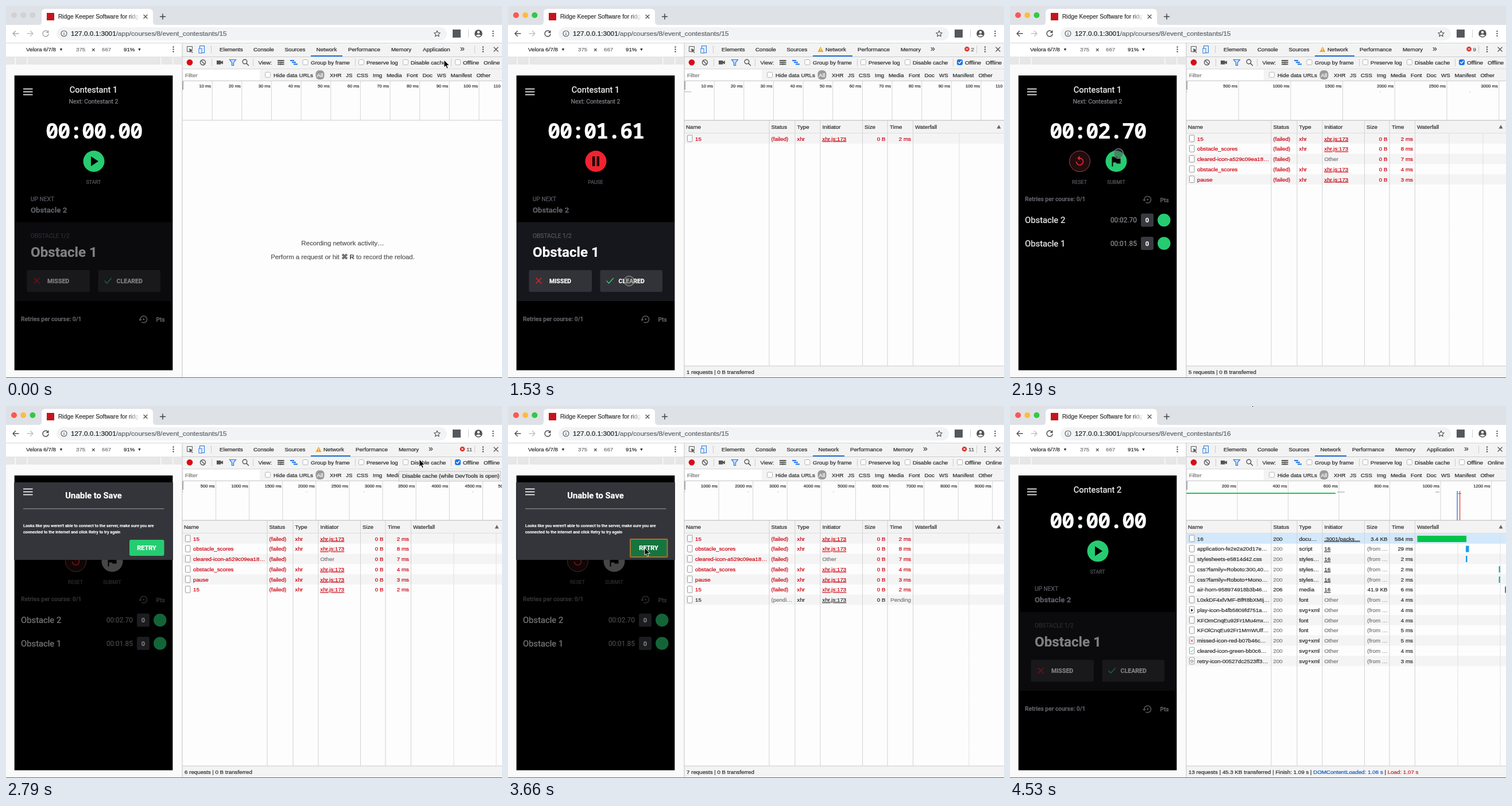
An HTML page that plays this animation: 864 px wide and 648 px high, repeating every 4560 ms.

```html
<!DOCTYPE html>
<html lang="en">
<head>
<meta charset="utf-8">
<title>Offline retry</title>
<style>
html, body { margin: 0; width: 100%; height: 100%; overflow: hidden; background: #fff; }
svg { display: block; width: 100vw; height: 100vh; font: 9.75px "Liberation Sans", Arial, sans-serif; fill: #2b2b2b; }
text { white-space: pre; stroke-width: .22px; }
.ph { font-family: Roboto, sans-serif; }
.mono { font: bold 37.5px "Noto Sans Mono", monospace; letter-spacing: -1.5px; }
.line { fill: none; stroke-linecap: round; stroke-linejoin: round; }
#cursor { animation: travel 4560ms ease-in-out infinite; }
#modal { animation: drop 4560ms ease-out infinite; }
@keyframes travel {
  0% { transform: translate(763px, 94px); }
  4%, 10% { transform: translate(786px, 97px); }
  18%, 21% { transform: translate(152px, 271px); }
  31%, 43% { transform: translate(211px, 479px); }
  48% { transform: translate(189px, 257px); }
  50%, 56% { transform: translate(185px, 269px); }
  61.2% { transform: translate(720px, 93px); }
  64%, 68% { transform: translate(786px, 97px); }
  77%, 83% { transform: translate(238px, 247px); }
  98%, 100% { transform: translate(417px, -13px); }
}
@keyframes drop {
  0%, 56.4% { transform: translateY(-150px); }
  59.5%, 100% { transform: none; }
}
</style>
</head>
<body>
<svg id="stage" viewBox="0 0 864 648" preserveAspectRatio="none"></svg>
<script>
const LOOP = 4560, START = 925, SPLIT = 1620, DONE = 1940, SAVE = 2570, RETRY = 3620, NAV = 4080, END = LOOP;
const OFF = 330, ON = 3020;
const INK = '#2b2b2b', GREEN = '#26cc71', RED = '#cc0010', BLUE = '#1a73e8';

const rect = (x, y, w, h, fill, more = '') => `<rect x="${x}" y="${y}" width="${w}" height="${h}" fill="${fill}" ${more}/>`;
const disc = (x, y, r, fill, more = '') => `<circle cx="${x}" cy="${y}" r="${r}" fill="${fill}" ${more}/>`;
const path = (d, fill, more = '') => `<path d="${d}" fill="${fill}" ${more}/>`;
const line = (d, color, w = 1, more = '') => `<path class="line" d="${d}" stroke="${color}" stroke-width="${w}" ${more}/>`;
const text = (x, y, s, fill = INK, more = '') => `<text x="${x}" y="${y}" fill="${fill}" stroke="${fill}" ${more}>${s}</text>`;
const span = (s, fill) => `<tspan fill="${fill}" stroke="${fill}">${s}</tspan>`;
const mid = 'text-anchor="middle"', end = 'text-anchor="end"';
// Shown only inside the given [from, to) pairs.
const at = (times, body) => `<g data-on="${times}">${body}</g>`;
const dots = (x, y) => [-4, 0, 4].map(d => disc(x, y + d, 1.2, '#555')).join('');
const check = (x, on) => rect(x - 4.5, 93.5, 9, 9, on ? BLUE : '#fff', `rx="2" stroke="${on ? BLUE : '#b5b5b5'}"`) +
  (on ? line(`M${x - 2.5} 98l2 2 3.3-4.2`, '#fff', 1.4) : '');

function browser() {
  const lights = colors => colors.map((c, i) => disc(14 + i * 16.2, 16, 5, c)).join('');
  const reload = c => line('M73 45A5 5 0 1 0 74 49', c, 1.5) + path('M74.5 42v5h-5z', c);
  const back = c => line('M22 48H12m4.5-4.5L12 48l4.5 4.5', c, 1.5);
  const url = id => text(113, 52, '127.0.0.1:3001' + span('/app/courses/8/event_contestants/' + id, '#5f6368'), '#222', 'font-size="11.8"');
  return rect(0, 0, 864, 34, '#dee1e6') + rect(0, 33, 864, 32, '#fff') +
    path('M56 33Q62 33 62 27V12Q62 5 69 5H249Q256 5 256 12V27Q256 33 262 33Z', '#fff') +
    at([0, 250], lights(Array(3).fill('#d0d2d5')) + reload('#aaa') + back('#aaa')) +
    at([250, END], lights(['#fc5753', '#fdbc40', '#34c749']) + reload('#505356') + back('#505356')) +
    rect(71, 12, 13, 13, '#c4151c') +
    text(91, 22, 'Ridge Keeper Software for ridge', '#333', 'font-size="10.2"') +
    rect(213, 8, 19, 20, 'url(#fade)') + rect(232, 8, 22, 20, '#fff') +
    line('M240 15.5l6 6m0-6l-6 6', '#555', 1.3) + line('M268.5 18.5h9m-4.5-4.5v9', '#444', 1.5) +
    rect(88, 37, 680, 23, '#f1f3f4', 'rx="11.5"') +
    line('M37 48h10m-4.5-4.5L47 48l-4.5 4.5', '#c0c2c4', 1.5) +
    disc(101, 48, 5, 'none', 'stroke="#5f6368" stroke-width="1.2"') + line('M101 47.5v3m0-5v.1', '#5f6368', 1.2) +
    at([0, NAV], url(15)) + at([NAV, END], url(16)) +
    line('M751 43l1.5 3.5 3.8.3-2.9 2.5.9 3.7-3.3-2-3.3 2 .9-3.7-2.9-2.5 3.8-.3z', '#555', 1.1) +
    rect(778, 41, 14, 14, '#55585c') + rect(805, 41, 1, 14, '#d0d0d0') +
    disc(823, 48, 6.8, '#505356') + disc(823, 45.7, 2.3, '#fff') + path('M818.5 51.5Q823 47.5 827.5 51.5Q823 55 818.5 51.5Z', '#fff') +
    dots(848.5, 48) + rect(0, 64, 864, 1, '#d4d4d4');
}

function deviceBar() {
  const arrow = x => text(x, 78, '▼', INK, 'font-size="7"');
  return rect(0, 65, 307, 583, '#fafafa') + rect(0, 65, 307, 24, '#fff') +
    text(35, 79, 'Velora 6/7/8') + arrow(92.5) +
    text(122, 79, '375', '#777') + text(149, 79.5, '×', INK, 'font-size="11"') + text(167, 79, '667', '#777') +
    text(205, 79, '91%') + arrow(229) + dots(291.5, 75.5) +
    rect(0, 89, 306, 13, '#e7e7e7') + [15.5, 36, 269, 290].map(x => rect(x, 89, 1.5, 13, '#fafafa')).join('') +
    rect(0, 88, 307, 1, '#e5e5e5');
}

const history = y => path('M14 12c0-1.1-.9-2-2-2s-2 .9-2 2 .9 2 2 2 2-.9 2-2zm-2-9c-4.97 0-9 4.03-9 9H0l4 4 4-4H5c0-3.87 3.13-7 7-7s7 3.13 7 7-3.13 7-7 7c-1.51 0-2.91-.49-4.06-1.3l-1.42 1.44C8.04 20.3 9.94 21 12 21c4.97 0 9-4.03 9-9s-4.03-9-9-9z',
  '#5b5d63', `transform="translate(231 ${y - 11.5}) scale(.73)"`);
const bold = size => `font-size="${size}" font-weight="700"`;
const retries = y => text(26, y, 'Retries per course: 0/1', '#5b5d63', bold(10.25)) +
  history(y) + text(261.5, y + 1.5, 'Pts', '#5b5d63', bold(10));
const score = (y, no, time) => text(26, y + 5.3, 'Obstacle ' + no, '#f4f4f4', 'font-size="14.8"') +
  text(221, y + 4.3, time, '#8b8d93', 'font-size="11.9" ' + end) + rect(228, y - 11.5, 22, 23, '#393a40', 'rx="3"') +
  text(239, y + 4, '0', '#fff', bold(11) + mid) + disc(268.3, y, 11.2, GREEN);
const caption = (x, s) => text(x, 310, s, '#595c64', 'font-size="8.8" ' + mid);
const play = disc(153, 270.5, 18.5, GREEN) + path('M148 262v17l13-8.5z', '#000') + caption(152.5, 'START');
const pause = disc(153, 270.5, 18.5, '#f0232f') + rect(147, 262, 4.3, 17, '#000') + rect(154.7, 262, 4.3, 17, '#000') + caption(152.5, 'PAUSE');
const heading = (no, next) => text(152.5, 151, 'Contestant ' + no, '#fff', 'font-size="14.6" ' + mid) +
  (next ? text(152.5, 170, 'Next: Contestant ' + next, '#85888f', 'font-size="10.4" ' + mid) : '');
const timer = id => text(69, 230.5, '00:00.00', '#fff', `class="mono" id="${id}"`);
const upNext = text(43, 340, 'UP NEXT', '#5c5f68', 'font-size="10.2"') + text(43, 359.5, 'Obstacle 2', '#5c5f66', bold(13.2));

function panel(no, opacity) {
  return `<g opacity="${opacity}">` + rect(15, 376.5, 275, 137.5, '#16171c') +
    text(43, 403.5, `OBSTACLE ${no}/2`, '#565960', 'font-size="10.2"') +
    text(43, 436.5, 'Obstacle ' + no, '#fff', bold(24.2)) +
    rect(36.5, 460, 109.5, 38, '#323338', 'rx="3"') + rect(160.5, 460, 108.5, 38, '#323338', 'rx="3"') +
    line('M49 474l9 9m0-9l-9 9', '#e02530', 1.4) + line('M172 479l3.6 4 7.6-8.6', GREEN, 1.5) +
    text(72, 482.7, 'MISSED', '#fff', bold(10.6)) + text(192.5, 482.7, 'CLEARED', '#fff', bold(10.6)) + '</g>';
}

function finish() {
  const flag = fill => disc(185, 270.5, 18.5, fill) + path('M14.4 6L14 4H5v17h2v-7h5.6l.4 2h7V6z', '#000', 'transform="translate(172.5 258.5)"');
  return disc(121.5, 270.5, 18, '#230c0d', 'stroke="#8a5050"') +
    path('M12 5V1L7 6l5 5V7c3.31 0 6 2.69 6 6s-2.69 6-6 6-6-2.69-6-6H4c0 4.42 3.58 8 8 8s8-3.58 8-8-3.58-8-8-8z', '#e0262f', 'transform="translate(111.3 260) scale(.85)"') +
    at([0, SAVE], flag(GREEN)) + at([SAVE, END], flag('#8e8e8e')) +
    caption(121, 'RESET') + caption(185, 'SUBMIT') + retries(340) +
    score(373, 2, '00:02.70') + score(413.5, 1, '00:01.85');
}

function modal() {
  const small = 'font-size="7.25" font-weight="500"';
  return rect(15, 121, 275, 513, '#000', 'opacity=".5"') + '<g id="modal">' + rect(14, 133, 277, 135, '#34353a') +
    text(152.5, 161, 'Unable to Save', '#fff', bold(14.7) + mid) +
    rect(30, 178.5, 245.5, 1, '#a0a1a5') +
    text(30, 211, 'Looks like you weren\'t able to connect to the server, make sure you are', '#fff', small) +
    text(30, 222, 'connected to the internet and click Retry to try again', '#fff', small) +
    at([SAVE, 3560], rect(215, 233, 60.5, 28, GREEN, 'rx="3"')) +
    at([3560, NAV], rect(213, 232, 64.5, 31, '#15753f', 'stroke="#a8702c" stroke-width="2" rx="1"')) +
    text(245, 251, 'RETRY', '#fff', bold(11) + mid) + '</g>';
}

function phone() {
  return '<g class="ph" clip-path="url(#screen)">' + rect(14, 121, 277, 514, '#000') +
    at([0, NAV], heading(1, 2) + timer('clock')) +
    at([0, SPLIT], upNext) +
    at([0, START], play + panel(1, .5)) +
    at([START, SPLIT], pause + panel(1, 1)) +
    at([SPLIT, DONE], pause + panel(2, 1) + score(581, 1, '00:01.85')) +
    at([0, DONE], retries(548.5)) +
    at([DONE, NAV], finish()) + at([SAVE, NAV], modal()) +
    at([4160, END], heading(2) + '<g transform="translate(0 -17.7)">' +
      timer('idle') + play + upNext + panel(1, .5) + retries(548.5) + '</g>') +
    [144.5, 149.5, 154.5].map(y => rect(30, y - .8, 16.5, 1.6, '#fff')).join('') + '</g>';
}

function tabs() {
  const names = list => list.map(([x, s]) => text(x, 79, s)).join('');
  const more = x => text(x, 79, '»', '#444', 'font-size="14"');
  const plain = names([[540.5, 'Network'], [596, 'Performance'], [671, 'Memory']]) + rect(531, 86, 55, 2, BLUE);
  const error = (x, n) => disc(x, 75, 4.3, '#d9302c') + line(`M${x - 1.5} 73.5l3 3m0-3l-3 3`, '#fff', 1) + text(x + 7, 79, n, '#555');
  return rect(307, 65, 557, 66, '#f3f3f3') +
    line('M320 79.5h-4.5v-9h9v4.5', '#555') + path('M319 74l7 3-3 1 2.5 3-1 1-2.5-3-1.5 2.5z', '#555') +
    rect(337.5, 69.5, 8, 12, 'none', `stroke="${BLUE}"`) + rect(336, 74, 5, 8, '#fff', `stroke="${BLUE}"`) +
    rect(357, 69, 1, 13, '#ccc') +
    names([[372, 'Elements'], [431, 'Console'], [485.5, 'Sources']]) +
    at([0, OFF, NAV, END], plain + text(726, 79, 'Application') + more(791)) +
    at([OFF, ON], names([[553, 'Network'], [609, 'Performance'], [684, 'Memory']]) + more(736) + rect(531, 86, 69, 2, BLUE) +
      path('M544.5 71l5 9h-10z', '#f0a31c') + rect(544, 74, 1, 3, '#fff') + rect(544, 78, 1, 1, '#fff')) +
    at([ON, NAV], plain + more(723)) +
    at([START, SPLIT], error(799.5, 2)) + at([SPLIT, DONE], error(799.5, 5)) +
    at([DONE, SAVE], error(799.5, 9)) + at([SAVE, NAV], error(795, 11)) +
    rect(816, 69, 1, 13, '#ccc') + dots(831, 75.5) + line('M850 72l7 7m0-7l-7 7', '#555', 1.4) +
    rect(307, 88, 557, 1, '#ccc');
}

function toolbar() {
  const bars = (x, c, shift) => [0, 1, 2].map(i => rect(x + i * shift, 94 + i * 3.2, 7, 2, c)).join('');
  const types = [[564, 'XHR'], [592, 'JS'], [611, 'CSS'], [639, 'Img'], [663, 'Media'], [698, 'Font'], [725.5, 'Doc'], [751, 'WS'], [774.5, 'Manifest'], [819.5, 'Other']];
  return disc(320, 98.3, 5.3, '#d80c18') + disc(343, 98.3, 4.5, 'none', 'stroke="#555" stroke-width="1.4"') + line('M340 95.2l6 6', '#555', 1.3) +
    [358, 430, 608, 775].map(x => rect(x, 92, 1, 13, '#ccc')).join('') +
    path('M367 95h7.5v2.2l3.5-2v6.4l-3.5-2v2.2H367z', '#555') + path('M389.5 93.5h11l-4 5v5h-3v-5z', '#cfe3ff', `stroke="${BLUE}" stroke-width="1.2"`) +
    disc(416, 97, 3.8, 'none', 'stroke="#555" stroke-width="1.4"') + line('M419 100l3.5 3.5', '#555', 1.6) +
    text(439.5, 101.5, 'View:') + bars(473, '#555', 0) + bars(477.5, '#555', 0) + bars(495, BLUE, 3) +
    check(521.5) + text(531, 101.5, 'Group by frame') + check(619) + text(628, 101.5, 'Preserve log') + check(696) + text(705, 101.5, 'Disable cache') +
    at([0, OFF, ON, END], check(787) + text(832, 101.5, 'Online')) +
    at([OFF, ON], check(787, true) + text(832, 101.5, 'Offline')) + text(796, 101.5, 'Offline') +
    rect(307, 109, 557, 1, '#ddd') + rect(309, 111, 133, 18, '#fff') + text(312, 123.7, 'Filter', '#777') +
    '<g transform="translate(0 21.8)">' + check(456) + '</g>' + text(466, 123.7, 'Hide data URLs') +
    rect(539.5, 112, 15, 16, '#9b9b9b', 'rx="6"') + text(547, 123.7, 'All', '#fff', mid) +
    types.map(([x, s]) => text(x, 123.7, s)).join('') + rect(307, 130, 557, 1, '#ccc');
}

// Cells: name, status, type, initiator, size, time.
function row(i, cells, color, dim = color, icon = '') {
  const y = 222 + i * 17.75, b = y + 12.6, [name, status, type, from, size, time] = cells;
  const other = from === 'Other';
  return (i % 2 ? '' : rect(308, y, 556, 17.75, name === '16' ? '#d3e8fb' : '#f4f4f4')) +
    rect(312.5, y + 3, 8.5, 11.5, '#fff', 'stroke="#999" rx="1"') + icon +
    text(326, b, name, color) + text(458.5, b, status, dim) + text(503.5, b, type, color) +
    text(547.5, b, from, other ? '#777' : color, other ? '' : 'text-decoration="underline"') +
    text(657.5, b, size, size.startsWith('(') ? dim : color, end) +
    text(702, b, time, time === 'Pending' ? dim : color, end);
}

function table() {
  const js = 'xhr.js:173', fail = (i, name, ms, from = js) => row(i, [name, '(failed)', from === js ? 'xhr' : '', from, '0 B', ms + ' ms'], RED);
  const cached = [
    ['application-fe2e2a20d17e…', 'script', '16', 29], ['stylesheets-e5814d42.css', 'styles…', '16', 2],
    ['css?family=Roboto:300,40…', 'styles…', '16', 2], ['css?family=Roboto+Mono…', 'styles…', '16', 2],
    ['air-horn-958974918b3b46…', 'media', '16', 6], ['L0xkDF4xlVMF-BfR8bXMIj…', 'font', 'Other', 4],
    ['play-icon-b4fb5809fd751a…', 'svg+xml', 'Other', 4], ['KFOmCnqEu92Fr1Mu4mx…', 'font', 'Other', 4],
    ['KFOlCnqEu92Fr1MmWUlf…', 'font', 'Other', 5], ['missed-icon-red-b07b46c…', 'svg+xml', 'Other', 5],
    ['cleared-icon-green-bb0c6…', 'svg+xml', 'Other', 4], ['retry-icon-00527dc2523ff3…', 'svg+xml', 'Other', 3]];
  const icons = { 7: path('M315.5 353.3v5l3.5-2.5z', '#000'), 10: line('M315 407l3.5 3.5m0-3.5l-3.5 3.5', RED, .9),
    11: line('M315 427l1.3 1.5 2.6-3.5', GREEN, .9), 12: disc(316.8, 444.5, 2, 'none', 'stroke="#555" stroke-width=".9"') };
  const loaded = cached.map(([name, type, from, ms], i) => {
    const full = type === 'media';
    return row(i + 1, [name, full ? 206 : 200, type, from, full ? '41.9 KB' : '(from …', ms + ' ms'], INK, full ? INK : '#777', icons[i + 1]);
  }).join('');
  const heads = [[310, 'Name'], [458.5, 'Status'], [503.5, 'Type'], [547.5, 'Initiator'], [621, 'Size'], [665, 'Time'], [709, 'Waterfall']];
  const status = (s, from, to) => at([from, to], text(311, 641, s));
  const failed = (n, from, to) => status(n + ' requests | 0 B transferred', from, to);
  return at([START, END],
    rect(307, 199, 557, 23, '#f3f3f3') + rect(307, 199, 557, 1, '#ccc') + rect(307, 221.5, 557, 1, '#ccc') +
    heads.map(([x, s]) => text(x, 214, s)).join('') + path('M851.5 213.5h7l-3.5-6.5z', '#666') +
    at([START, NAV], fail(0, '15', 2)) +
    at([SPLIT, NAV], fail(1, 'obstacle_scores', 8) + fail(2, 'cleared-icon-a529c09ea18…', 7, 'Other')) +
    at([DONE, NAV], fail(3, 'obstacle_scores', 4) + fail(4, 'pause', 3)) +
    at([SAVE, NAV], fail(5, '15', 2)) +
    at([RETRY, NAV], row(6, ['15', '(pendi…', 'xhr', js, '0 B', 'Pending'], INK, '#777')) +
    at([NAV, END], row(0, ['16', 200, 'docu…', ':3001/packs…', '3.4 KB', '584 ms'], INK)) +
    at([4180, END], loaded) +
    [455, 500, 544, 617.5, 661, 705.5].map(x => rect(x - .5, 200, 1, 427, '#d2d2d2')).join('') +
    '<g id="grid"></g>' +
    at([NAV, END], rect(709.5, 226, 85.5, 11, '#00c34a')) +
    at([4180, END], rect(794, 243.5, 5.5, 11, '#1b9cf0') + rect(794, 261, 2.5, 11, '#1b9cf0') +
      rect(851.5, 279, 2.3, 11, '#2aa7a0') + rect(851.5, 297, 2.3, 11, '#2aa7a0') + rect(862, 314.5, 2, 11, '#5a7fae')) +
    rect(307, 627, 557, 20, '#f3f3f3') + rect(307, 626.5, 557, 1, '#ccc') +
    failed(1, START, SPLIT) + failed(3, SPLIT, DONE) + failed(5, DONE, SAVE) + failed(6, SAVE, RETRY) + failed(7, RETRY, NAV) +
    status('1 requests | 3.4 KB transferred', NAV, 4180) +
    status('13 requests | 45.3 KB transferred | Finish: 1.09 s | ' + span('DOMContentLoaded: 1.06 s', '#0b57c0') + ' | ' + span('Load: 1.07 s', '#c5221f'), 4180, END));
}

function overview() {
  const hint = (y, s) => text(586.5, y, s, '#555', 'font-size="11.4" ' + mid);
  return rect(307, 131, 557, 516, '#fdfdfd') + '<g id="axis"></g>' + rect(307, 131, 2, 15, '#999') + rect(307, 198.5, 557, 1, '#ccc') +
    at([NAV, END], rect(307, 151, 260, 2, '#1fc455')) +
    at([4180, END], rect(570, 149.3, 13, 1.2, '#aaa') + rect(741, 149.3, 7, 1.2, '#aaa') + rect(780, 152, 6, 1.2, '#2aa7a0') +
      rect(778.5, 148, 1.2, 51, '#2a62c9') + rect(783, 148, 1.2, 51, '#d03a35')) +
    at([0, START], hint(416.5, 'Recording network activity…') +
      hint(440.5, 'Perform a request or hit <tspan font-weight="700">⌘ R</tspan> to record the reload.'));
}

// [from, ms per tick, px per tick, px per tick in the waterfall column]
const scales = [[0, 10, 51.65, 80], [START, 10, 51.65, 80], [SPLIT, 200, 52.5, 80], [DONE, 500, 90.7, 59],
  [SAVE, 500, 58.1, 74], [RETRY, 1000, 59.6, 97], [NAV, 200, 88.5, 74]];
// [seen from, request time in ms]
const requests = [[START, 0], [SPLIT, 1860], [DONE, 2720], [SAVE, 4350]];

function drawAxis([from, step, px, gap]) {
  const dash = 'stroke-dasharray="1.5 1" stroke-linecap="butt"';
  let ticks = '', grid = '';
  for (let n = 1; n * px < 610; n++) {
    const x = 307.5 + n * px;
    ticks += line(`M${x} 131V199`, '#d0d0d0', 1, dash) + text(x - 2, 142, n * step + ' ms', INK, 'font-size="7.6" ' + end);
  }
  const seen = from < NAV ? requests.filter(r => r[0] <= from) : [];
  for (const [, ms] of seen) ticks += rect(307 + ms * px / step, 149, Math.max(1.5, 2.4 * px / step), 1, '#b0b0b0');
  for (let x = 706 + gap; x < 864; x += gap) grid += line(`M${x} 222V627`, '#ddd', 1, dash);
  axis.innerHTML = ticks;
  gridLines.innerHTML = grid;
}

const stage = document.getElementById('stage');
stage.innerHTML = `<defs><clipPath id="screen">${rect(14.7, 121, 275.7, 513.5, '#000')}</clipPath>
  <linearGradient id="fade"><stop stop-color="#fff" stop-opacity="0"/><stop offset="1" stop-color="#fff"/></linearGradient></defs>` +
  rect(0, 0, 864, 648, '#fff') + browser() + deviceBar() + phone() + tabs() + toolbar() + overview() + table() +
  rect(306.5, 65, 1, 583, '#c4c4c4') + rect(0, 647, 864, 1, '#666') +
  at([2760, 2860], rect(684.5, 113.5, 177, 17.5, '#ededed', 'stroke="#c8c8c8"') + text(690, 125.3, 'Disable cache (while DevTools is open)')) +
  '<g id="cursor">' +
  at([0, 710, SAVE, END], path('M0 0V13L3 10.3L5 15L7.2 14L5.2 9.5H9.3Z', '#000', 'stroke="#fff" stroke-width=".9"')) +
  at([710, SAVE], disc(0, 0, 8.5, 'rgba(70,70,70,.45)', 'stroke="rgba(150,150,150,.8)" stroke-width="1.5"')) + '</g>';

const axis = document.getElementById('axis'), gridLines = document.getElementById('grid'), clock = document.getElementById('clock');
const parts = [...stage.querySelectorAll('[data-on]')].map(el => [el, el.dataset.on.split(',').map(Number)]);
let origin, scale;

function draw(now) {
  origin ??= now;
  const t = (now - origin) % LOOP;
  for (const [el, times] of parts) {
    const on = times.some((from, i) => i % 2 === 0 && t >= from && t < times[i + 1]);
    el.style.display = on ? '' : 'none';
  }
  const next = scales.findLast(s => t >= s[0]);
  if (next !== scale) drawAxis(scale = next);
  const time = Math.min(2.7, Math.max(0, (t - START) * 2.661 / 1000));
  clock.textContent = '00:' + time.toFixed(2).padStart(5, '0');
  requestAnimationFrame(draw);
}
requestAnimationFrame(draw);
</script>
</body>
</html>
```
